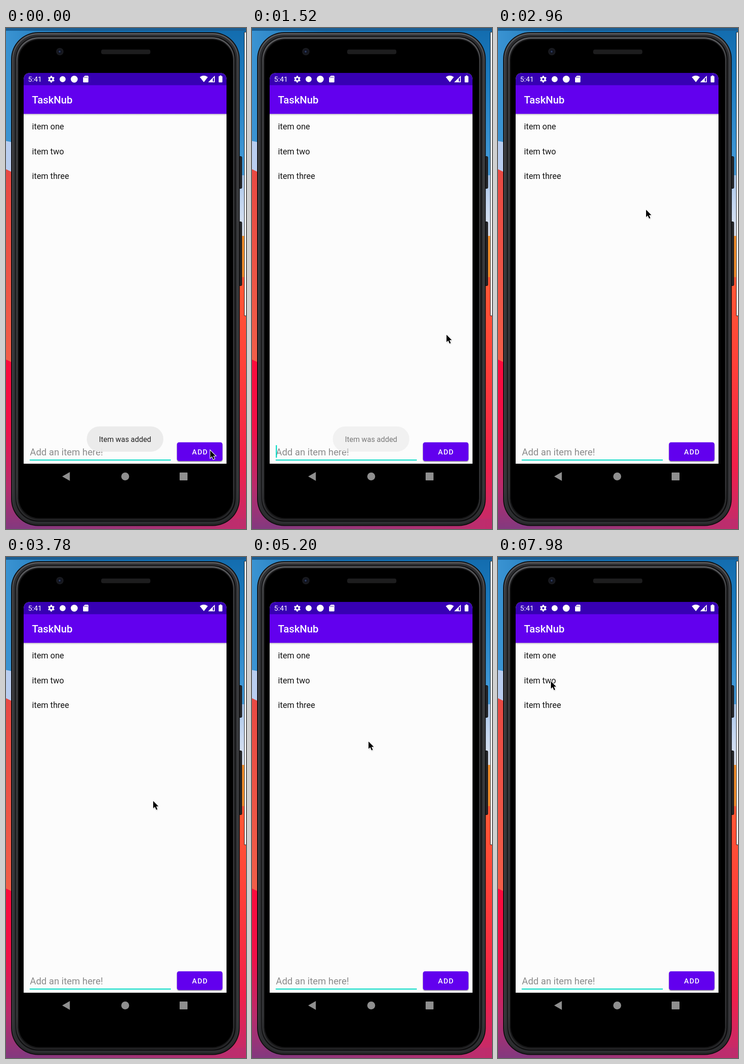
An HTML page that plays this animation: 517 by 1082 pixels, repeating every 8 s.

```html
<!DOCTYPE html>
<html lang="en">
<head>
<meta charset="utf-8">
<title>To-do list</title>
<style>
  html, body { margin: 0; width: 100%; height: 100%; overflow: hidden; background: #000; }
  svg { display: block; width: 517px; height: 1082px; font-family: Roboto, "Liberation Sans", sans-serif; }
  .medium { font-weight: 500; fill: #fff; }
  .item { font-size: 17.8px; fill: #141414; }
</style>
</head>
<body>
<svg viewBox="0 0 517 1082">
  <defs>
    <linearGradient id="sky" x2="0" y2="1">
      <stop offset="0" stop-color="#136cae"/><stop offset=".35" stop-color="#1c7cc0"/><stop offset="1" stop-color="#4a9fdc"/>
    </linearGradient>
    <linearGradient id="glow">
      <stop offset="0" stop-color="#3a93d2"/><stop offset="1" stop-color="#3a93d2" stop-opacity="0"/>
    </linearGradient>
    <linearGradient id="coral" x2="0" y2="1">
      <stop offset="0" stop-color="#e84943"/><stop offset="1" stop-color="#f25f49"/>
    </linearGradient>
    <linearGradient id="rose" x2="0" y2="1">
      <stop offset="0" stop-color="#fb0b3c"/><stop offset=".4" stop-color="#f01048"/>
      <stop offset=".75" stop-color="#b92b6c"/><stop offset="1" stop-color="#83397f"/>
    </linearGradient>
    <linearGradient id="side" x2="0" y2="1">
      <stop offset="0" stop-color="#ff5a36"/><stop offset=".35" stop-color="#ff4038"/>
      <stop offset=".75" stop-color="#f2204a"/><stop offset="1" stop-color="#bf2c6d"/>
    </linearGradient>
    <linearGradient id="pale" x2="0" y2="1">
      <stop offset="0" stop-color="#a9c6ea"/><stop offset=".5" stop-color="#c6d7f0"/><stop offset="1" stop-color="#dfe4ee"/>
    </linearGradient>
    <linearGradient id="floor">
      <stop offset="0" stop-color="#83397f"/><stop offset="1" stop-color="#c02c6c"/>
    </linearGradient>
    <linearGradient id="rim" x2="0" y2="1">
      <stop offset="0" stop-color="#5c5d60"/><stop offset=".06" stop-color="#46474a"/>
      <stop offset=".93" stop-color="#3c3d40"/><stop offset="1" stop-color="#232325"/>
    </linearGradient>
    <linearGradient id="shade" x2="0" y2="1">
      <stop offset="0" stop-color="#000" stop-opacity=".2"/><stop offset="1" stop-color="#000" stop-opacity="0"/>
    </linearGradient>
    <filter id="soft" x="-50%" y="-50%" width="200%" height="200%"><feGaussianBlur stdDeviation="1.3"/></filter>
  </defs>

  <!-- wallpaper -->
  <rect width="517" height="330" fill="url(#sky)"/>
  <rect width="160" height="250" fill="url(#glow)"/>
  <path d="M0 244L40 252V330H0Z" fill="#b9cdef"/>
  <path d="M0 305L40 324V740H0Z" fill="url(#coral)"/>
  <path d="M0 716L40 735V1082H0Z" fill="url(#rose)"/>
  <rect x="470" y="318" width="47" height="134" fill="url(#pale)"/>
  <rect x="470" y="449" width="47" height="92" fill="#f8932f"/>
  <rect x="470" y="538" width="47" height="544" fill="url(#side)"/>
  <rect y="1060" x="40" width="477" height="22" fill="url(#floor)"/>
  <rect width="517" height="6" fill="#1a5e94"/>
  <path d="M519 9H513.5V621.5H519" fill="#fbfbfb" stroke="#1c1c1c"/>

  <!-- phone body: dark edge, metal band, groove, inner band, glass -->
  <g fill="#242528" stroke="#0b0b0c">
    <rect x="500" y="277.500" width="8" height="69" rx="2"/>
    <rect x="500" y="418.500" width="8" height="138" rx="2"/>
  </g>
  <rect x="11" y="9" width="492.500" height="1066.500" rx="58" fill="#0d0d0e"/>
  <rect x="13" y="11" width="488.500" height="1062.500" rx="56" fill="url(#rim)"/>
  <rect x="16" y="14" width="482.500" height="1056.500" rx="53" fill="#2d2e31"/>
  <rect x="20.500" y="18.500" width="474" height="1047.500" rx="49" fill="#0c0c0d"/>
  <rect x="22" y="20" width="470" height="1044" rx="48" fill="url(#rim)"/>
  <rect x="25" y="23" width="465" height="1038" rx="46" fill="#161617"/>
  <rect x="27.500" y="25.500" width="461" height="1033" rx="44"/>
  <circle cx="116" cy="51" r="8" fill="#18191e"/>
  <circle cx="116" cy="51" r="4.500" fill="#10131f"/>
  <circle cx="115.500" cy="51" r="2" fill="#2d3c62"/>
  <rect x="205" y="46.500" width="106" height="10" rx="4" fill="#1d1d1e"/>

  <!-- app -->
  <path d="M38 941V112Q38 97 53 97H460Q475 97 475 112V941Z" fill="#fcfcfc"/>
  <path d="M38 124V112Q38 97 53 97H460Q475 97 475 112V124Z" fill="#3700b3"/>
  <rect x="38" y="123.500" width="437" height="62" fill="#6200ee"/>
  <rect x="38" y="185.500" width="437" height="4" fill="url(#shade)"/>
  <text x="47.500" y="116" font-size="15.400" fill="#fff">5:41</text>
  <g fill="#fff">
    <g transform="translate(97.500 110.500)">
      <circle r="4" fill="none" stroke="#fff" stroke-width="3.200"/>
      <g id="teeth"></g>
    </g>
    <circle cx="122" cy="110.500" r="6.500"/>
    <circle cx="147" cy="110.500" r="7.500"/>
    <path d="M170 103H176Q177.500 103 177.500 104.500V116Q177.500 117.500 176 117.500H167.500Q166 117.500 166 116V107Z"/>
    <path d="M417.500 106Q426 99.500 434.800 106L426.200 117Z"/>
    <path d="M449.500 103.500V117H436ZM448 107L445.500 109.500V115.500H448Z" fill-rule="evenodd"/>
    <path d="M449.500 103.500V117H436Z" fill="none" stroke="#fff" stroke-width=".6"/>
    <path d="M460.500 102.500H464V104H465Q466.200 104 466.200 105.200V116.300Q466.200 117.500 465 117.500H459.300Q458.100 117.500 458.100 116.300V105.200Q458.100 104 459.300 104H460.500Z"/>
  </g>
  <path d="M168.500 105.500V108M171.500 105V108M174.500 105V108" stroke="#3700b3"/>
  <text class="medium" x="56" y="163" font-size="22.200">TaskNub</text>
  <text class="item" x="56" y="219">item one</text>
  <text class="item" x="56" y="272.500">item two</text>
  <text class="item" x="56" y="326">item three</text>

  <text x="51.500" y="922.500" font-size="20.200" fill="#8b8b8b">Add an item here!</text>
  <rect x="51" y="932" width="304" height="2.200" fill="#03dac5"/>
  <rect id="caret" x="51.300" y="901" width="2.400" height="27" fill="#03dac5"/>
  <rect x="368.500" y="897" width="98" height="40" rx="4.500" fill="#000" opacity=".38" filter="url(#soft)"/>
  <rect x="368.300" y="894.800" width="98" height="40.400" rx="4.500" fill="#6200ee"/>
  <text class="medium" x="400.800" y="921" font-size="15.400" letter-spacing="1.380">ADD</text>

  <g id="toast">
    <rect x="174" y="860.500" width="165" height="54.500" rx="27" fill="#eaeaea" fill-opacity=".93"/>
    <text x="200.300" y="894" font-size="15.900" fill="#222">Item was added</text>
  </g>

  <!-- navigation -->
  <g fill="#8f8f8f">
    <path d="M121 968.500L137.500 959V978Z"/>
    <circle cx="256.800" cy="968.500" r="8.500"/>
    <rect x="374" y="960" width="17" height="17" rx="1"/>
  </g>

  <g id="pointer">
    <path d="M1 3V19L5 16L8 22L11 20.500L8.500 15H13Z" opacity=".35" filter="url(#soft)"/>
    <path d="M1 1.500V17.300L4.700 13.900L7.600 20.600L10.200 19.500L7.400 13H12.300Z" stroke="#fff" stroke-width="2.200" paint-order="stroke"/>
  </g>
</svg>
<script>
  const LOOP = 8000;
  const $ = id => document.getElementById(id);
  const play = (id, frames) => $(id).animate(
    frames.map(({ at, ...style }) => ({ offset: at / LOOP, ...style })),
    { duration: LOOP, iterations: Infinity }
  );

  // gear teeth
  $('teeth').innerHTML = [0, 1, 2, 3, 4, 5].map(i =>
    `<rect x="-1.700" y="-7.200" width="3.400" height="3" rx=".5" transform="rotate(${i * 60})"/>`).join('');

  // time, x, y of the pointer tip
  const path = [
    [0, 439, 911], [300, 439, 911], [1520, 418, 661], [2960, 318, 391],
    [4360, 315, 599], [5200, 250, 397], [6600, 135, 263], [7980, 113, 267], [8000, 113, 267]
  ];
  play('pointer', path.map(([at, x, y]) => ({
    at, transform: `translate(${x}px, ${y}px)`, easing: 'ease-in-out'
  })));

  play('toast', [
    { at: 0, opacity: 1 }, { at: 1320, opacity: 1 }, { at: 1820, opacity: 0 }, { at: LOOP, opacity: 0 }
  ]);

  // caret: half a second on, half a second off
  $('caret').animate(
    [{ opacity: 0 }, { opacity: 0, offset: .28 }, { opacity: 1, offset: .28 },
     { opacity: 1, offset: .78 }, { opacity: 0, offset: .78 }, { opacity: 0 }],
    { duration: 1000, iterations: Infinity }
  );
</script>
</body>
</html>
```
